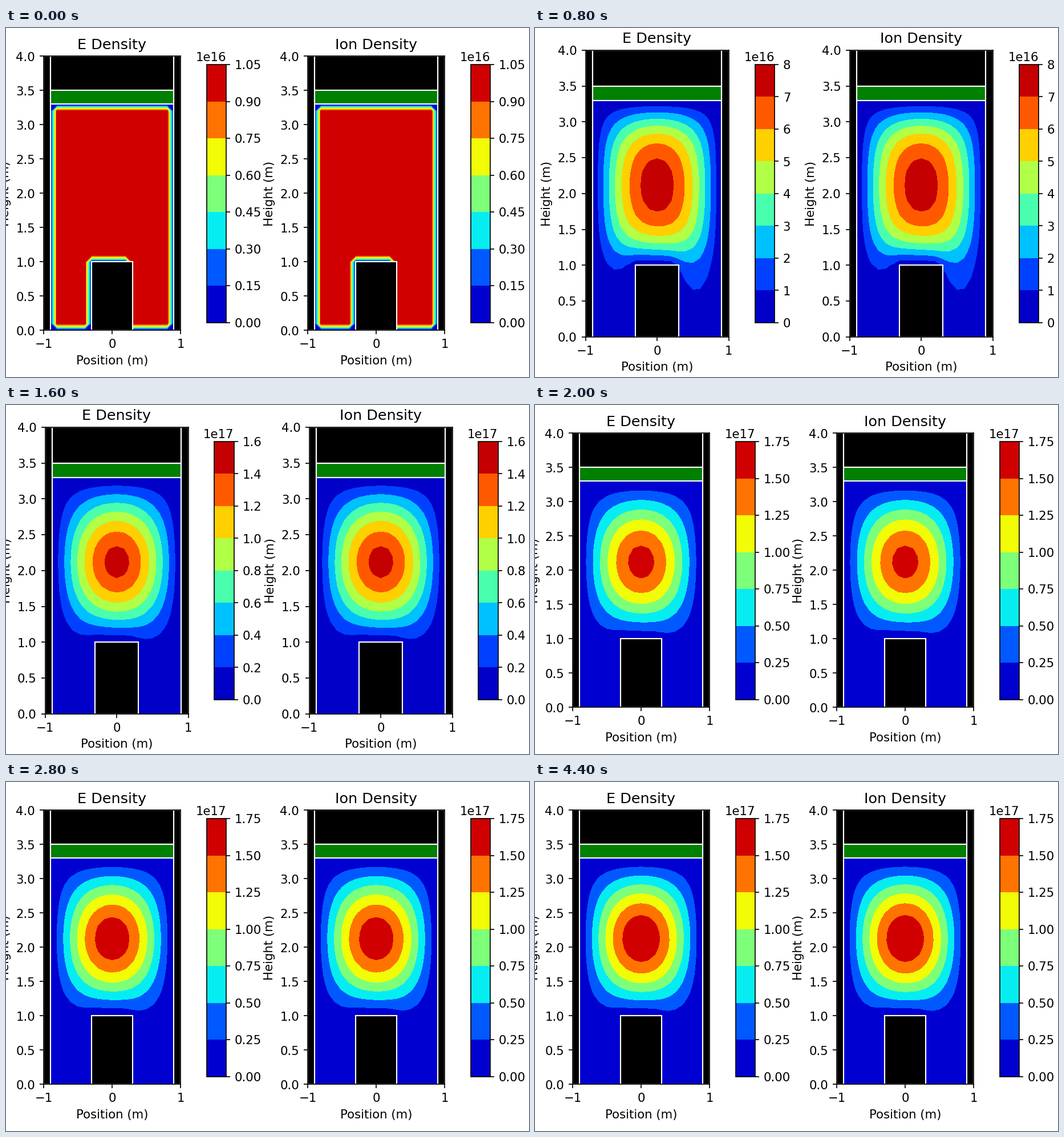
A matplotlib script for the animation above (5400 ms loop, 917x611 px).

```python
import numpy as np
import matplotlib.pyplot as plt
from matplotlib.animation import FuncAnimation
from matplotlib.patches import Rectangle

W, H, DPI = 917, 611, 152.75
INTERVAL, FRAMES, STATES = 200, 27, 12
PANEL_SHIFT = 463

plt.rcParams["font.family"] = "DejaVu Sans"

# Chamber grid, 0.1 m spacing; density is held at zero on every wall
STEP = 0.1
ix, iy = np.meshgrid(np.arange(-10, 11), np.arange(41))
X, Y = ix * STEP, iy * STEP
block = (ix >= -3) & (ix <= 2) & (iy <= 10)
plasma = (abs(ix) < 9) & (iy > 0) & (iy < 33) & ~block

# Axes box (left, top, width, height) in pixels and colorbar left edge
WIDE_LABELS = (66, 49.5, 240, 480, 351.5)
SHORT_LABELS = (68.5, 39, 251, 502, 365)
INT_LABELS = (88.5, 39, 251, 502, 385.5)

# Per state: layout, top level, number of bands, peak density
SCALES = [
    (WIDE_LABELS, 1.05e16, 7, 1.0e16),
    (SHORT_LABELS, 3.2e16, 8, 2.94e16),
    (INT_LABELS, 8e16, 8, 7.57e16),
    (SHORT_LABELS, 1.4e17, 7, 1.235e17),
    (SHORT_LABELS, 1.6e17, 8, 1.48e17),
]
for n in range(STATES - len(SCALES)):
    SCALES.append((WIDE_LABELS, 1.75e17, 7, (1.725 - 0.123 * 0.59**n) * 1e17))


def diffuse(u, duration, dt=0.0005, growth=3.5):
    """Diffusion with density-driven growth, kept at a peak of one."""
    for _ in range(round(duration / dt)):
        lap = np.zeros_like(u)
        lap[1:-1, 1:-1] = (u[2:, 1:-1] + u[:-2, 1:-1] + u[1:-1, 2:]
                           + u[1:-1, :-2] - 4 * u[1:-1, 1:-1]) / STEP**2
        u = np.where(plasma, u + dt * (lap + growth * u * u), 0)
        u /= u.max()
    return u


def build_profiles():
    times = [0, 0.0065, 0.11, 0.25] + [0.35 + 0.1 * k for k in range(STATES - 4)]
    u, now, profiles = plasma.astype(float), 0, []
    for t in times:
        u, now = diffuse(u, t - now), t
        profiles.append(u)
    return profiles


PROFILES = build_profiles()

fig = plt.figure(figsize=(917.01 / DPI, 611.01 / DPI), dpi=DPI, facecolor="white")


def pixel_axes(left, top, width, height):
    return fig.add_axes([left / W, 1 - (top + height) / H, width / W, height / H])


def add_box(ax, x, y, width, height, color="black"):
    ax.add_patch(Rectangle((x, y), width, height, facecolor=color,
                           edgecolor="white", linewidth=1))


def draw_panel(title, shift, layout, density, levels):
    left, top, width, height, bar_left = layout
    ax = pixel_axes(left + shift, top, width, height)
    filled = ax.contourf(X, Y, density, levels=levels, cmap="jet")
    add_box(ax, -1, 0, 0.1, 4)
    add_box(ax, 0.9, 0, 0.1, 4)
    add_box(ax, -0.9, 3.5, 1.8, 0.5)
    add_box(ax, -0.9, 3.3, 1.8, 0.2, "green")
    add_box(ax, -0.3, 0, 0.6, 1)
    ax.set(xlim=(-1, 1), ylim=(0, 4), title=title,
           xlabel="Position (m)", ylabel="Height (m)",
           xticks=[-1, 0, 1], yticks=np.arange(0, 4.1, 0.5))
    fig.colorbar(filled, cax=pixel_axes(bar_left + shift, 64, 34.5, 452))


def update(frame):
    state = min(frame * INTERVAL // 400, STATES - 1)
    layout, top_level, bands, peak = SCALES[state]
    levels = np.linspace(0, top_level, bands + 1)
    density = PROFILES[state] * peak
    fig.clear()
    draw_panel("E Density", 0, layout, density, levels)
    draw_panel("Ion Density", PANEL_SHIFT, layout, density, levels)
    return []


anim = FuncAnimation(fig, update, frames=FRAMES, interval=INTERVAL,
                     init_func=lambda: [], repeat=True, repeat_delay=0, blit=False)
plt.show()
```
